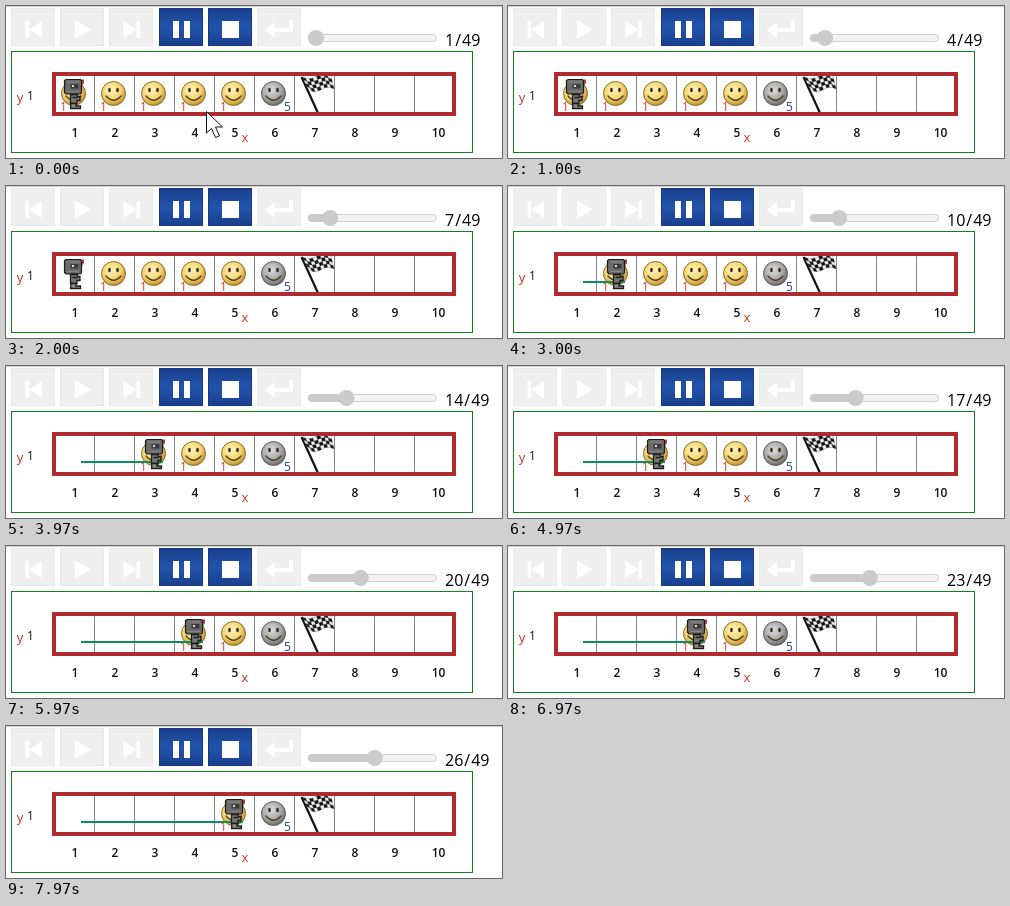
These frames come from a looping animation (496 by 152 pixels, 8000 ms). An HTML page:

```html
<!DOCTYPE html>
<html lang="en">
<head>
<meta charset="utf-8">
<title>Robot on a grid</title>
<style>
  html, body { margin: 0; width: 100%; height: 100%; overflow: hidden; background: #fff; }
  svg { display: block; width: 496px; height: 152px; }
  text { font-family: "Open Sans", "Noto Sans", sans-serif; }
  .col { font-size: 12px; font-weight: 600; fill: #111; text-anchor: middle; }
  .axis { font-size: 13px; fill: #c2341c; text-anchor: middle; }
  .worth { font-size: 12px; text-anchor: middle; }
  .count { font-size: 16px; fill: #000; }
  .icon { fill: #fff; }
</style>
</head>
<body>
<svg viewBox="0 0 496 152">
  <defs>
    <radialGradient id="gold" cx=".42" cy=".36" r=".64">
      <stop offset="0" stop-color="#fff4bd"/>
      <stop offset=".6" stop-color="#f3d672"/>
      <stop offset="1" stop-color="#c2912f"/>
    </radialGradient>
    <radialGradient id="grey" cx=".42" cy=".36" r=".64">
      <stop offset="0" stop-color="#dcdcdc"/>
      <stop offset=".6" stop-color="#a9a9a9"/>
      <stop offset="1" stop-color="#6c6c6c"/>
    </radialGradient>
    <linearGradient id="blue" x2="0" y2="1">
      <stop offset="0" stop-color="#193f8c"/>
      <stop offset=".5" stop-color="#2254ac"/>
      <stop offset="1" stop-color="#193f8c"/>
    </linearGradient>
    <g id="face" fill="none" stroke="#4a3b1d" stroke-linecap="round">
      <ellipse cx="-4" cy="-3.5" rx="1.3" ry="2.3" fill="#33291a" stroke="none"/>
      <ellipse cx="4" cy="-3.5" rx="1.3" ry="2.3" fill="#33291a" stroke="none"/>
      <path d="M-7.5 2.5Q0 11 7.5 2.5" stroke-width="1.3"/>
    </g>
  </defs>

  <rect width="496" height="1" fill="#d2d2d2"/>
  <g id="buttons"></g>
  <g class="icon">
    <path d="M19.500 15h3.500v17h-3.500zM36 15v17L23 23.500z"/>
    <path d="M69 14.500v18L85 23.500z"/>
    <path d="M117.500 15v17L130.500 23.500zM130.500 15h3.500v17h-3.500z"/>
    <path d="M167 15h6v17h-6zM178 15h6v17h-6z"/>
    <path d="M216 15h17v17h-17z"/>
    <path d="M283 14h4v12h-18v6l-10-8 10-8v6h14z"/>
  </g>

  <rect x="302.500" y="28.500" width="128" height="7" rx="3.500" fill="#f3f3f3" stroke="#d0d0d0"/>
  <rect id="done" x="302" y="28" height="8" rx="4" fill="#cbcbcb"/>
  <circle id="thumb" cy="32" r="8" fill="#cbcbcb"/>
  <text class="count" x="439" y="39.500"><tspan id="step"></tspan><tspan dx="1">/</tspan><tspan dx="1">49</tspan></text>

  <rect x="5.500" y="45.500" width="461" height="101" fill="#fff" stroke="#0b8418"/>
  <g id="grid"></g>
  <text class="axis" x="14" y="96">y</text>
  <text class="col" x="24.500" y="94" style="font-weight:400">1</text>
  <text class="axis" x="239" y="136">x</text>
  <g id="smileys"></g>
  <g id="flag"><path d="M295.500 71L312 107" stroke="#111" stroke-width="2.200"/></g>
  <rect x="48" y="68" width="400" height="40" fill="none" stroke="#b02a30" stroke-width="4"/>
  <path id="trail" fill="none" stroke="#0b8f5c" stroke-width="2"/>

  <g id="robot">
    <path d="M76 80v-3h1.500" fill="none" stroke="#444"/>
    <rect x="76" y="73.500" width="2" height="4" fill="#c8323c"/>
    <path d="M60 73.500h14.500l1 1v12l-1 1.500H60l-1.500-1.500v-12z" fill="#6b6b6b" stroke="#1c1c1c" stroke-width="1.200"/>
    <path d="M61 76h12M61 85.500h12" stroke="#858585"/>
    <rect x="64.500" y="78" width="8" height="4.500" fill="#3b3b3b"/>
    <rect x="66" y="79" width="2" height="2" fill="#ddd"/>
    <path d="M64.500 88.500h7v2h2.500v4h-3v3h-6.500z" fill="#777" stroke="#1c1c1c" stroke-width="1.300"/>
    <path d="M66.500 91.500h5" stroke="#1c1c1c" stroke-width="1.500"/>
    <path d="M65 97.500h5v2.500h4.500v2.500H64.500z" fill="#8b8b8b" stroke="#1c1c1c" stroke-width="1.300"/>
  </g>

  <path id="cursor" d="M200.500 105.500v21.500l5-4.500 4 9 4-1.800-4-8.700h7z" fill="#fff" stroke="#111"/>
</svg>
<script>
const NS = "http://www.w3.org/2000/svg";
const $ = id => document.getElementById(id);

function add(parent, tag, attrs, text) {
  const el = document.createElementNS(NS, tag);
  for (const key in attrs) el.setAttribute(key, attrs[key]);
  if (text !== undefined) el.textContent = text;
  return parent.appendChild(el);
}

const CELL = 40, LOOP = 8000;

for (let i = 0; i < 6; i++) {
  const active = i === 3 || i === 4;
  add($("buttons"), "rect", {
    x: 5.5 + Math.round(i * 49.2), y: 2.5, width: 43, height: 37,
    fill: active ? "url(#blue)" : "#efefef", stroke: active ? "#173a80" : "#e9e9e9"
  });
}

for (let col = 1; col <= 10; col++) {
  const x = 48.5 + col * CELL;
  if (col < 10) add($("grid"), "path", { d: `M${x} 70V106`, stroke: "#858585" });
  add($("grid"), "text", { class: "col", x: 29 + col * CELL + (col === 10 ? 3.5 : 0), y: 131 }, col);
}

const smileys = [];
for (let col = 1; col <= 6; col++) {
  const grey = col === 6;
  const g = add($("smileys"), "g", { transform: `translate(${27.5 + col * CELL} 87.5)` });
  add(g, "circle", { r: 12, fill: grey ? "url(#grey)" : "url(#gold)", stroke: grey ? "#5c5c5c" : "#8f6d2c" });
  add(g, "use", { href: "#face" });
  add(g, "text", { class: "worth", x: grey ? 14 : -10, y: 17.5, fill: grey ? "#1c3f94" : "#e03a24" }, grey ? 5 : 1);
  smileys.push(g);
}

// Waving checkered cloth: u runs along the flag, v down it.
function cloth(u, v) {
  const x = 296 + u * 29 + v * (7 - 4 * u);
  const y = 71 + v * 13 - u + 2 * Math.sin(u * 6.3);
  return `${x.toFixed(1)} ${y.toFixed(1)}`;
}
for (let i = 0; i < 8; i++) {
  for (let j = 0; j < 4; j++) {
    const a = i / 8, b = (i + 1) / 8, c = j / 4, d = (j + 1) / 4;
    add($("flag"), "path", {
      d: `M${cloth(a, c)}L${cloth(b, c)}L${cloth(b, d)}L${cloth(a, d)}Z`,
      fill: (i + j) % 2 ? "#f4f4f4" : "#161616", stroke: "#333", "stroke-width": 0.25
    });
  }
}

// start time, step, robot column, smileys collected
const STATES = [
  [0, 1, 1, 0], [1000, 4, 1, 0], [2000, 7, 1, 1],
  [3000, 10, 2, 1], [3970, 14, 3, 2], [4970, 17, 3, 2],
  [5970, 20, 4, 3], [6970, 23, 4, 3], [7970, 26, 5, 4]
];
let shown = null;

function show(state) {
  const [start, step, col, eaten] = state;
  const thumbX = 310 + (step - 1) * 113 / 48;
  const shift = (col - 1) * CELL;
  $("thumb").setAttribute("cx", thumbX);
  $("done").setAttribute("width", thumbX - 302);
  $("step").textContent = step;
  $("robot").setAttribute("transform", `translate(${shift + (col > 1 ? 1 : 0)} 0)`);
  $("trail").setAttribute("d", col > 1 ? `M75 96H${77 + shift}` : "");
  smileys.forEach((g, i) => g.style.display = i < eaten ? "none" : "");
  $("cursor").style.display = start === 0 ? "" : "none";
}

function tick() {
  const t = performance.now() % LOOP;
  const state = STATES.findLast(s => s[0] <= t);
  if (state !== shown) show(shown = state);
  requestAnimationFrame(tick);
}
tick();
</script>
</body>
</html>
```
